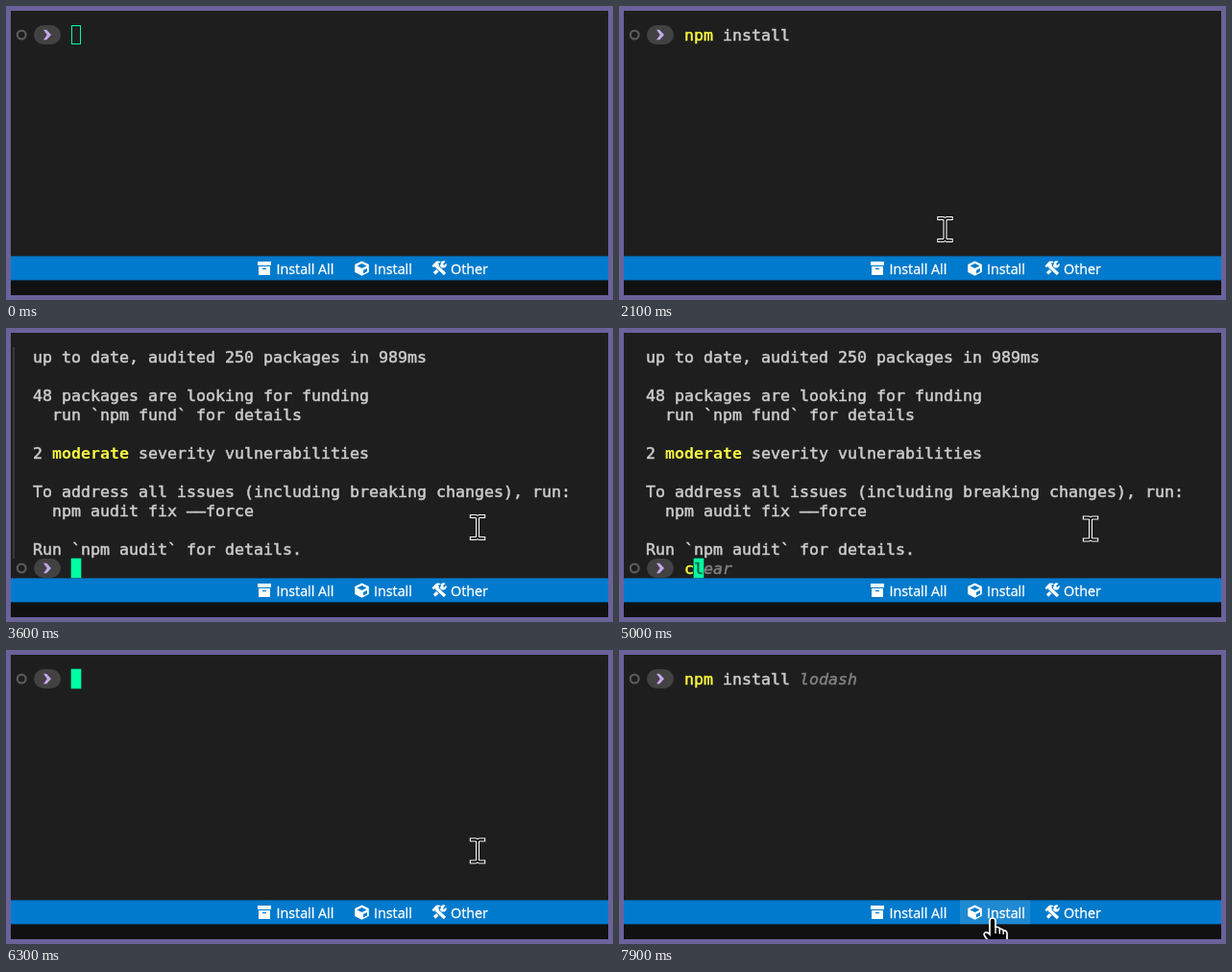
An HTML page with a canvas for the animation above (8 s loop, 632 by 306 pixels).

```html
<!DOCTYPE html>
<html lang="en">
<head>
<meta charset="utf-8">
<title>Terminal install buttons</title>
<style>
  html, body { margin: 0; width: 100%; height: 100%; overflow: hidden; background: #6a6299; }
  canvas { display: block; }
</style>
</head>
<body>
<canvas id="stage" width="632" height="306"></canvas>
<script>
const ctx = document.getElementById('stage').getContext('2d');
const LOOP = 8000, STEP = 100;
const CELL = 10, ROW = 20, LEFT = 28, TOP = 20, INPUT_COL = 4;
const MONO = '"DejaVu Sans Mono", monospace', SANS = '"Open Sans", "Noto Sans", sans-serif';
const BG = '#1e1e1e', TEXT = '#cccccc', YELLOW = '#f5f543', GHOST = '#808080', CURSOR = '#00ffa3', BLUE = '#007acc';

const OUTPUT = [
  'up to date, audited 250 packages in 989ms',
  '',
  '48 packages are looking for funding',
  '  run `npm fund` for details',
  '',
  '2          severity vulnerabilities',
  '',
  'To address all issues (including breaking changes), run:',
  '  npm audit fix --force',
  '',
  'Run `npm audit` for details.'
];

// Completion label and the indices of its matched letters
const COMPLETIONS = [
  ['Close-SmbSession', [0, 1, 6]],
  ['Clear-FileStorageTier', [0, 1, 10]],
  ['ClipDLS.exe', [0, 1, 6]],
  ['Clear-AssignedAccess', [0, 1, 7]],
  ['cacls.exe', [2, 3, 4]],
  ['Clear-Disk', [0, 1, 8]],
  ['Clear-DnsClientCache', [0, 1, 8]],
  ['Clear-History', [0, 1, 8]]
];

const BUTTONS = [
  { label: 'Install All', textX: 281.5, x: 255, w: 93, icon: archiveIcon },
  { label: 'Install', textX: 383, x: 355, w: 73, icon: cubeIcon },
  { label: 'Other', textX: 463, x: 436, w: 72, icon: toolsIcon }
];

// Pointer stops: time, x, y
const POINTER = [
  [0, 400, 306], [900, 306, 278], [1700, 306, 278], [2100, 339.5, 232.5], [2800, 339.5, 232.5],
  [3400, 490, 205], [3600, 491, 207.5], [3800, 491, 207.5], [3900, 491, 209],
  [6300, 491, 209], [7100, 390, 280], [LOOP, 390, 280]
];

function rect(x, y, w, h, color) {
  ctx.fillStyle = color;
  ctx.fillRect(x, y, w, h);
}

// "weight" thickens the letters with a hairline outline
function text(str, x, y, color, font, weight = 0) {
  ctx.font = font;
  ctx.fillStyle = ctx.strokeStyle = color;
  ctx.fillText(str, x, y);
  if (weight) {
    ctx.lineWidth = weight;
    ctx.strokeText(str, x, y);
  }
}

function shape(d, fill, stroke, width = 1) {
  const path = new Path2D(d);
  if (fill) { ctx.fillStyle = fill; ctx.fill(path); }
  if (stroke) { ctx.strokeStyle = stroke; ctx.lineWidth = width; ctx.stroke(path); }
}

function at(x, y, draw) {
  ctx.save();
  ctx.translate(x, y);
  draw();
  ctx.restore();
}

// Terminal fonts draw the hyphen nearly as wide as its cell
const wideHyphens = str => str.replaceAll('-', '–');

function term(str, col, row, color = TEXT, style = '') {
  text(wideHyphens(str), LEFT + col * CELL, TOP + row * ROW + 16, color,
       `${style} 16.61px ${MONO}`, style === 'bold' ? 0 : 0.5);
}

function cursor(col, row, covered = '') {
  rect(LEFT + col * CELL - 0.3, TOP + row * ROW - 0.3, CELL + 0.6, ROW + 0.6, CURSOR);
  if (covered) term(covered, col, row, '#14634a');
}

function hollowCursor() {
  ctx.strokeStyle = CURSOR;
  ctx.lineWidth = 1;
  ctx.strokeRect(68.5, 20.5, 9, 19);
}

function prompt(row) {
  at(0, TOP + row * ROW, () => {
    ctx.beginPath();
    ctx.arc(16.2, 10, 4.4, 0, 7);
    ctx.strokeStyle = '#5a5a5a';
    ctx.lineWidth = 2.2;
    ctx.stroke();
    ctx.beginPath();
    ctx.roundRect(29, 0, 28, 20, 10);
    ctx.fillStyle = '#424242';
    ctx.fill();
    shape('M39 4.8 H42.2 L47 10 L42.2 15.2 H39 L42.8 10Z', '#c8a8f0');
  });
}

function npmInstall() {
  term('npm', INPUT_COL, 0, YELLOW);
  term('install', INPUT_COL + 4, 0);
}

function progress(t) {
  const done = t < 2400 ? 4 : t < 2500 ? 11 : 18;
  const spinner = t < 2400 ? '|' : t < 2500 ? '/' : t < 2700 ? '-' : '\\';
  const task = t < 2500 ? 'idealTree: timing idealTree:#root Comple'
                        : 'reify: timing reify:loadBundles Completed';
  term(`[${'#'.repeat(done)}${'.'.repeat(18 - done)}] ${spinner} ${task}`, 0, 1);
}

function output() {
  OUTPUT.forEach((line, row) => term(line, 0, row));
  term('moderate', 2, 5, YELLOW, 'bold');
}

function popup() {
  rect(98, 5, 529, 237, '#454545');
  rect(99, 5, 528, 236, '#252526');
  rect(99, 187, 528, 27, '#2a2c31');
  rect(99, 214, 528, 1, '#454545');
  const font = `17.05px ${MONO}`;
  ctx.font = font;
  const advance = ctx.measureText('m').width;
  COMPLETIONS.forEach(([label, hits], i) => {
    const y = 15.2 + i * 26.25;
    at(112, y, () => {
      shape('M-4.5 -7 Q-10 0 -4.5 7 M4.5 -7 Q10 0 4.5 7', null, '#b180d7', 1.4);
      shape('M3 -5 Q0.5 -6 0 -2 L-1 3 Q-1.5 6 -3.5 5 M-2.5 -1 H2.5', null, '#b180d7', 1.4);
    });
    [...wideHyphens(label)].forEach((ch, k) => {
      const hit = hits.includes(k);
      text(ch, 126.5 + k * advance, y + 6, hit ? '#2aaaff' : TEXT, (hit ? 'bold ' : '') + font, hit ? 0 : 0.5);
    });
  });
  const hint = `12.8px ${SANS}`;
  text('Insert (Tab)', 107, 234, '#8a8a8a', hint);
  ctx.textAlign = 'right';
  text('Configure (Ctrl+Shift+,)', 626, 234, '#8a8a8a', hint);
  ctx.textAlign = 'left';
}

function archiveIcon() {
  rect(262, 266, 14, 4, '#fff');
  rect(263, 271, 12, 9, '#fff');
  rect(267, 273, 4, 1.2, BLUE);
}

function cubeIcon() {
  shape('M370.5 265.5 L377.8 269 V277 L370.5 280.8 L363.2 277 V269Z', '#fff');
  shape('M365.5 270.5 L370.5 268 L375.5 270.5 L370.5 273Z', BLUE);
  shape('M372 275 L376 273 V276.2 L372 278.4Z', BLUE);
}

function toolsIcon() {
  shape('M446 278.5 L455 269.5', null, '#fff', 3.2);
  shape('M453 266.5 Q455.5 264.5 457.5 266 L455 268.5 L456 270 L458.5 267.8 Q459.5 271 456.5 272.5 Q453.5 273 452.2 270.5Z', '#fff');
  shape('M449 271.5 L457 279', null, BLUE, 5);
  shape('M448.5 271 L457 279', null, '#fff', 3.2);
  shape('M443.5 270.5 L448 265.8 Q451 265 453 267 L450 267.5 L451 270 L448 273 L446.5 271 L445.2 272.3Z', '#fff');
}

function statusBar(pointer) {
  rect(5, 285, 622, 16, '#111111');
  rect(5, 260.4, 622, 25, BLUE);
  for (const b of BUTTONS) {
    const hover = pointer.y >= 260 && pointer.y < 286 && pointer.x >= b.x && pointer.x < b.x + b.w;
    if (hover) rect(b.x, 260.4, b.w, 25, 'rgba(255,255,255,.12)');
    b.icon();
    text(b.label, b.textX, 279, '#fff', `14.3px ${SANS}`, 0.3);
  }
}

function pointerAt(t) {
  const i = POINTER.findIndex(stop => stop[0] > t);
  const [t0, x0, y0] = POINTER[i - 1], [t1, x1, y1] = POINTER[i];
  const u = (t - t0) / (t1 - t0), ease = u * u * (3 - 2 * u);
  return { x: x0 + (x1 - x0) * ease, y: y0 + (y1 - y0) * ease };
}

function hand() {
  ctx.translate(-1, 0);
  shape('M-3 2 Q-3 -1 0 -1 Q3 -1 3 2 V9 Q3 8 5.5 8.5 Q7.5 9 7.5 10.5 Q10 9.8 11.2 12 Q14.5 11.5 15 15 V21 ' +
        'Q15 25 12 28 V31 H-1 Q-1 28 -4 24 L-8 18 Q-10 15 -7.5 14 Q-5.5 13.5 -3 16Z', '#000', '#fff', 1.7);
  shape('M3 9 V15 M7.3 11 V15.5 M11.2 12.5 V16', null, '#fff', 1.4);
}

function beam() {
  const d = 'M-6.2 -11.5 H-2 L0 -10.5 L2 -11.5 H6.2 M-6.2 11.5 H-2 L0 10.5 L2 11.5 H6.2 M0 -10.5 V10.5';
  ctx.lineCap = 'square';
  shape(d, null, '#fff', 4);
  shape(d, null, '#000', 1.8);
}

function terminal(t) {
  const between = (a, b) => t >= a && t < b;
  if (t < 2900) {
    prompt(0);
    if (t < 1200) hollowCursor();
    else npmInstall();
    if (between(1300, 1800)) cursor(0, 1);
    if (t >= 2300) progress(t);
  } else if (t < 6000) {
    output();
    if (between(3600, 4900)) rect(7, 20, 2, 220, '#37373b');
    if (t >= 3100) prompt(11);
    if (between(3100, 3900) || between(4400, 4700)) cursor(INPUT_COL, 11);
    if (between(5300, 5600)) popup();
    if (t >= 4900) {
      const typed = t < 5200 ? 'c' : t < 5400 ? 'cl' : 'cls';
      const ghost = t < 5400 ? 'clear'.slice(typed.length) : '';
      const end = INPUT_COL + typed.length;
      term(typed, INPUT_COL, 11, YELLOW);
      term(ghost.slice(1), end + 1, 11, GHOST, 'italic');
      if (t < 5600) cursor(end, 11, ghost[0] || 'l');
    }
  } else {
    prompt(0);
    if (t < 6700) cursor(INPUT_COL, 0);
    if (t >= 7200) npmInstall();
    if (t >= 7300) term('lodash', INPUT_COL + 12, 0, GHOST, 'italic');
    if (between(7200, 7800)) cursor(INPUT_COL + 12, 0, t >= 7300 ? 'l' : '');
  }
}

function draw(t) {
  const pointer = pointerAt(t);
  rect(0, 0, 632, 306, '#6a6299');
  ctx.save();
  ctx.beginPath();
  ctx.rect(5, 5, 622, 296);
  ctx.clip();
  rect(5, 5, 622, 280, BG);
  terminal(t);
  statusBar(pointer);
  const overPopup = t >= 5300 && t < 5600;
  at(pointer.x, pointer.y, pointer.y >= 260 || overPopup ? hand : beam);
  ctx.restore();
}

const start = performance.now();
function frame() {
  const t = (performance.now() - start) % LOOP;
  draw(Math.floor(t / STEP) * STEP);
  requestAnimationFrame(frame);
}
frame();
</script>
</body>
</html>
```
